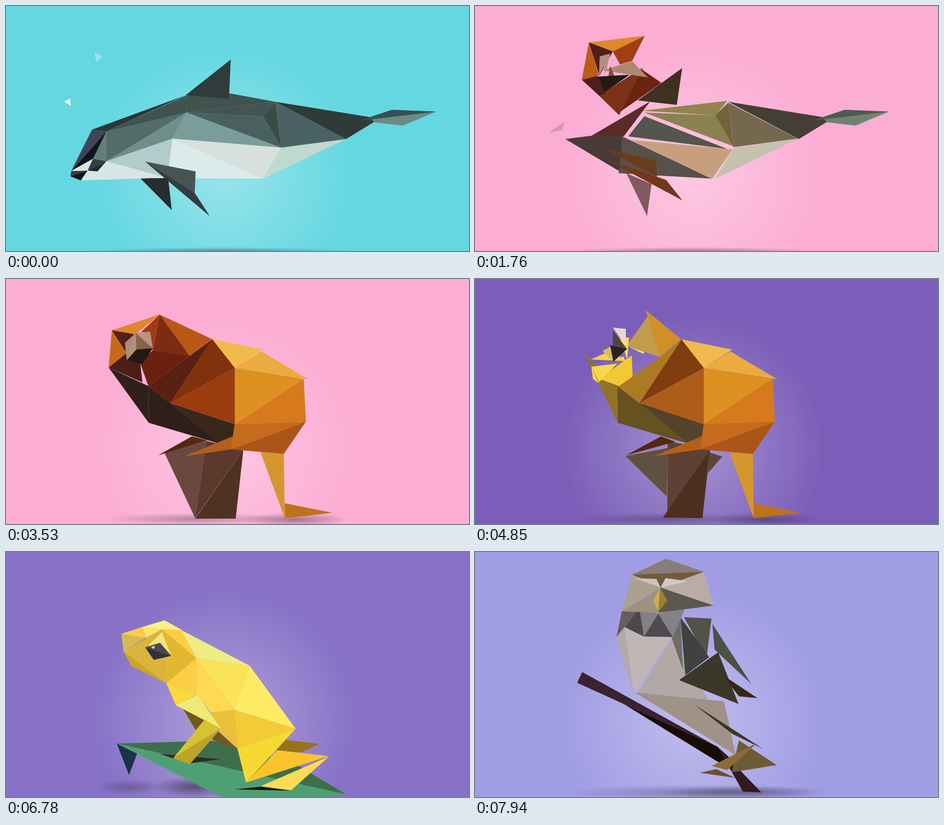
These frames come from a looping animation (1028x545 px, 8 s). An HTML page with a canvas:

```html
<!DOCTYPE html>
<html lang="en">
<head>
<meta charset="utf-8">
<title>Animals in shards</title>
<style>
html, body { margin: 0; width: 100%; height: 100%; overflow: hidden; background: #64d7e1; }
canvas { display: block; width: 1028px; height: 545px; }
</style>
</head>
<body>
<canvas id="stage" width="1028" height="545"></canvas>
<script>
const W = 1028, H = 545, LOOP = 8000;
const ctx = document.getElementById('stage').getContext('2d');

const clamp = v => Math.max(0, Math.min(1, v));
const span = (t, a, b) => clamp((t - a) / (b - a));
const ease = p => 1 - (1 - p ** 1.3) ** 2.5;
const smooth = p => p * p * (3 - 2 * p);
const mix = (a, b, p) => a.map((v, i) => v + (b[i] - v) * p);
const rgb = hex => [0, 2, 4, 6].map(i => i < hex.length ? parseInt(hex.substr(i, 2), 16) / (i > 5 ? 255 : 1) : 1);
const css = c => `rgba(${c[0]},${c[1]},${c[2]},${c[3]})`;

// Pose: "colour x,y x,y x,y"; a lone colour keeps the previous outline.
function pose(text, prev) {
  const [hex, ...pts] = text.split(' ');
  if (!pts.length) return { c: rgb(hex), p: prev.p };
  while (pts.length < 4) pts.push(pts[pts.length - 1]);
  return { c: rgb(hex), p: pts.join(',').split(',').map(Number) };
}

const pieces = [];

// Back to front: porpoise, break-up, raised head, monkey, break-up, frog, owl, first stroke
function piece(whale, burst, raised, monkey, scatter, frog, owl, stroke) {
  const i = pieces.length;
  const lag = i === 4 || i === 33 ? 1 : i > 29 ? 0.6 : 0.92 - i / 33;
  const d = pose(whale), m = pose(burst, d);
  const a = raised && pose(raised, m);
  const k = pose(monkey, m), n = pose(scatter, a || k);
  const f = pose(frog, n), o = pose(owl, f);
  const keys = [];
  if (stroke) keys.push([0, 1000, d]);
  keys.push([1200, 1760, m, 950]);
  if (a) keys.push([1760, 2250, a], [2650, 2850, k], [3910, 4080, a]);
  else keys.push([1760 + (m.p === d.p ? 300 * lag : 0), 2300 + 1230 * lag, k]);
  keys.push([4390, 4850, n], [4850, 5200 + 700 * lag, f], [6800 + 500 * lag, 7500 + 440 * lag, o]);
  pieces.push({ first: stroke ? pose(stroke) : d, keys });
}

// Ground, tail and belly
piece('0d1518 262,383 328,383 372,427', '805a5c 336,372 392,396 382,467', '', '6a4840 352,387 445,360 420,532',
  '60503f 334,394 428,376 426,484', '3d6f4b 246,426 463,420 640,470 755,539', '392231 227,291 238,267 538,433 330,338',
  '262c2f 262,383 324,383 332,454');
piece('d296ad00 170,300 160,320 175,315', 'd296ad 199,257 164,282 193,276', '', '5c382d 445,360 527,380 420,532',
  '5c4134 428,361 523,378 427,535', '4f9f74 246,426 755,539 700,546 480,546', '180d05 330,338 538,433 570,462 546,471');
piece('6b8a84 749,255 919,235 845,266', '708272', '', '4f3221 527,380 510,533 420,533',
  '4c301f 522,380 505,532 417,531', '1c3248 246,426 291,449 273,496', '311a22 538,433 636,535 595,533');
piece('dbebea 333,295 322,383 535,384', '58504a 327,290 319,372 526,384', '', '2f1f19 316,238 317,320 476,367 365,276',
  '665120', '2e2c26 341,449 371,459 408,470 477,461', 'a09289 354,312 553,332 579,452');
piece('355055 749,255 821,231 919,235', '4e5a50', '', 'bf721a 620,532 619,499 724,520',
  'bf721a', '14150f 508,528 567,522 633,531', '68522f 500,491 536,483 576,502');
piece('7a9d9b 333,295 365,237 575,315', '52564e 340,290 376,245 560,318', '', '3a271b 365,276 508,323 504,350 474,366',
  '54432a', '735817 457,417 470,398 514,438', 'b2a8a5 362,312 437,192 518,328');
piece('b2cccb 187,345 333,295 322,383', '4a3a36 201,296 328,280 320,367', '30201b 240,165 316,238 317,320',
  '30201b 228,197 316,238 317,320', '8f7328 242,166 316,238 317,320', '735917 393,349 441,373 421,396', 'b3aaa5 314,190 332,167 352,318');
piece('bfd9d1 535,384 575,315 719,296', 'c4c2ac 533,384 575,316 716,296', '', 'd5962e 619,532 565,385 617,389',
  'd5962e', '997118 600,441 621,418 696,427 655,446', '6d5b33 570,490 586,419 670,474');
piece('2e3b39 562,213 771,247 781,258 719,296', '443f35', '', 'ab5519 499,379 666,317 617,389',
  'ab5519', 'fbc42f 533,513 602,441 717,454', '3c3829 453,285 540,223 585,338');
piece('d8e0dd 333,295 575,315 535,384', 'c6a07e 347,298 572,319 526,385', '', 'c66a1b 508,323 666,317 499,379',
  'c66a1b', 'f7da31 514,438 643,393 533,513', '35281a 549,273 627,325 586,321');

// Flanks and back
piece('3a4c48 562,213 575,315 535,246', '71643b 562,215 575,316 533,243', '', 'd67a1d 661,222 666,317 508,323',
  'd67a1d', 'e9c138 507,351 514,438 470,395 455,357', '4e5044 527,160 613,293 532,217');
piece('4a605f 365,237 535,246 575,315', '8a8151 376,237 534,243 573,312', '', 'dc9120 508,198 661,222 508,323',
  'dc9120', 'f3cb34 507,351 643,393 514,438', '545246 464,145 525,148 514,236');
piece('4b6265 562,213 719,296 575,315', '74694f 562,215 716,295 575,314', '', 'ebab3f 567,161 671,223 508,198',
  'ebab3f', 'ffeb63 541,253 643,393 507,351', '3f4143 456,145 520,234 467,274');
piece('435452 365,237 562,213 535,246', '91844f 370,233 560,211 534,243', '', 'f2ba4c 458,134 571,157 508,198',
  'f2ba4c', 'fae357 422,236 541,253 507,351', '706b66 437,192 456,145 462,263');
piece('41534f 362,200 459,194 562,213 365,237', '5a2b27 388,213 330,290 260,288', '', '81310b 458,134 508,198 365,276',
  '7f3c0d', 'ffd94f 422,236 507,351 455,357 423,316', 'c0b7b5 332,167 375,188 437,190 353,312');
piece('2b3738 155,275 187,279 362,199', '4a3a36 201,296 320,367 328,280', '', '9c3d10 365,276 508,323 508,198',
  'ad5d19', 'fbcf45 356,292 423,317 422,236', '858287 407,137 439,189 467,124');
piece('536c67 187,279 187,345 365,237', '5a2b27 260,288 330,290 388,213', '5a2014 316,238 365,276 458,136 410,175',
  '5a2014 316,238 365,276 458,134 408,171', 'ac7a25', 'fcd93d 356,292 377,341 423,317', '4e4b4e 375,188 439,189 407,137');
piece('2f3c3b 362,199 463,119 459,206', '3e3121 361,210 460,138 448,220', 'b85815 379,69 458,134 410,174',
  'b85815 341,79 458,134 408,171', 'd18f29', 'f0ec84 388,173 541,253 422,236', '838084 365,125 407,137 375,188');

// Head
piece('6f8e8a 187,345 365,237 333,295', '6a2510 369,140 414,171 323,235', '6a2110 337,148 410,174 316,238 290,195',
  '6a2110 326,158 408,171 316,238 298,187', 'f2c934 275,222 348,170 350,217 320,238', 'e2b830 346,172 422,236 356,292', '5c574d 412,79 530,119 407,135');
piece('41534f 187,279 362,200 365,237', '7b3218 373,137 320,243 275,199', '7d2c12 377,66 410,174 337,148',
  '7d2c12 341,79 408,171 326,160', 'c09c4c 384,82 410,174 337,148', 'ffcd45 346,172 388,173 422,236', 'baaca4 508,44 530,119 412,79');
piece('627f7c 187,279 187,345 157,340', 'a03f15 377,66 349,122 322,130 306,101', 'a03c15',
  'a03c15 341,79 326,160 315,118 300,118', 'fdd94e 342,130 338,180 322,131', 'ffe569 346,172 312,191 302,167', '4d494b 365,125 375,188 332,167');
piece('d6e6e3 145,366 187,345 320,382 130,388', '4d1f1a 237,164 272,155 290,195 275,199', '4d1d19 237,164 272,150 290,195 320,243',
  '4d1d19 228,197 270,160 298,187 303,230', 'fcd748 259,195 316,188 275,230', 'cba528 261,222 356,292 279,254', '695c5d 326,132 365,125 314,189');
piece('3f4653 109,367 155,275 187,279', 'e0882c 253,81 377,66 306,101', 'e0862c',
  'e0862c 235,114 341,79 287,123', 'f5e38a 339,150 375,162 375,167', 'fdf07f 302,167 352,152 392,174 345,172', '897d7a 349,50 424,15 508,44');
piece('101420 187,279 157,340 109,367', 'bc5c17 253,81 275,155 237,164', 'c56a1b',
  'c56a1b 235,114 268,165 228,197', 'fcdc48 258,193 274,232 262,222', 'd3ba54 256,182 312,190 261,222', 'aba190 349,50 412,79 326,132');
piece('333d3d 109,367 145,366 107,379', '4f1f18 253,81 306,101 276,155', '55201a',
  '55201a 235,114 287,123 268,165', 'f8d044 257,179 300,160 340,183', 'fdcb47 256,182 302,167 312,191', '715a3f 349,50 508,44 412,79');

// Muzzle, eye and beak
piece('0f1420 107,379 145,366 130,388', 'b48f80 278,113 300,106 290,150', 'ad8b79 282,133 306,108 285,172',
  'ad8b79 264,142 288,120 268,181', 'd9bd5d 283,160 305,148 303,180', 'dcb43c 261,222 346,172 356,292', 'a0907f 326,132 412,80 407,135');
piece('dbe5dc 109,367 157,340 145,366', 'ad8870 283,143 349,123 384,159', 'b8937d 306,108 335,111 338,154',
  'b8937d 288,120 320,117 326,154', 'e7dad0 306,108 335,111 335,149', 'f3e383 315,209 346,178 367,231', 'd1c7c3 412,79 423,58 473,65');
piece('353f42 157,340 187,345 145,366', '7a4f30 300,133 310,157 296,158', '876344 306,110 338,154 305,150',
  '876344 288,120 326,154 289,158', '4f453b 306,115 337,155 306,147', '4a4a4c 342,202 367,231 309,212', 'cfc3c0 354,58 403,60 412,79');
piece('202a30 145,366 187,345 167,368', '241b14 273,157 343,153 288,192', '221a14 302,149 338,154 312,184 284,174',
  '221a14 289,157 326,154 303,189 268,181', '2b2226 300,147 338,155 307,184', '35303a 309,212 367,231 328,240', 'cfae4a 396,108 411,80 407,133');
piece('dbe5dc 109,367 157,340 145,366', 'b48f80 277,112 300,106 275,155', 'b3917f 306,108 305,150 285,172',
  'b3917f 288,120 289,157 268,181', 'fdd94e 322,175 332,172 330,180', 'f5e98e 322,211 331,209 328,216', '99802f 411,80 427,108 407,133');

// Flippers, arms and feet
piece('465553 273,346 387,368 413,410', '6b3c1c 288,317 402,344 404,381', '', '52290e 338,392 413,350 447,359',
  '52290e 336,392 413,350 445,362', 'efe978 377,341 425,317 477,393', '3b3820 488,340 640,438 572,405',
  '465553 273,346 385,368 383,416');
for (const [frog, owl] of [['d8c232 371,459 441,373 476,393', '8c6a38 526,476 626,425 560,485'],
                           ['bba428 371,459 477,393 408,472', '8c6a38 526,476 626,425 560,485']])
  piece('343c42 273,346 413,410 456,446', '73371a 290,341 424,387 460,432', '', 'b45f19 397,394 504,350 499,379',
    'b45f19', frog, owl, '343c42 273,346 383,416 416,467');
piece('355055 749,255 821,231 919,235', '4e5a50', '', 'bf721a 620,532 619,499 724,520',
  '5d4437 521,386 549,395 517,432', 'ffda54 565,521 717,455 633,530', '68522f 500,491 536,483 576,502');

// Backdrop colours: start, end, colour
const skies = [[900, 1700, 'fcadd4'], [4390, 4900, '7a5eb9'], [6600, 7400, 'a19de4']];

// Two ground shadows: x, y, rx, ry, alpha
const shadows = [
  [0, 0, [480, 547, 300, 11, .4], [480, 547, 200, 8, .1]],
  [1800, 3400, [420, 534, 200, 14, .3], [640, 535, 120, 15, .4]],
  [5000, 5900, [275, 523, 75, 18, .28], [415, 523, 90, 23, .5]],
  [6900, 7900, [500, 535, 300, 18, .3], [590, 534, 180, 14, .35]]
];

const bubbles = [
  [129, 213, 142, 206, 144, 222, .9],
  [196, 102, 214, 112, 201, 125, .35],
  [165, 41, 173, 38, 172, 45, .1],
  [165, 41, 173, 38, 172, 45, 0]
];

function poly(p, fill) {
  ctx.fillStyle = fill;
  ctx.beginPath();
  for (let i = 0; i < p.length; i += 2) ctx.lineTo(p[i], p[i + 1]);
  ctx.fill();
}

function blob(x, y, rx, ry, tint, alpha) {
  const g = ctx.createRadialGradient(0, 0, 0, 0, 0, 1);
  g.addColorStop(0, `rgba(${tint},${alpha})`);
  g.addColorStop(1, `rgba(${tint},0)`);
  ctx.save();
  ctx.translate(x, y);
  ctx.scale(rx, ry);
  ctx.fillStyle = g;
  ctx.beginPath();
  ctx.arc(0, 0, 1, 0, 7);
  ctx.fill();
  ctx.restore();
}

function backdrop(t) {
  let sky = rgb('64d7e1');
  for (const [a, b, hex] of skies) sky = mix(sky, rgb(hex), ease(span(t, a, b)));
  ctx.fillStyle = css(sky);
  ctx.fillRect(0, 0, W, H);
  blob(485, 375, 292, 292, '255,255,255', .33);
  for (const n of [2, 3]) {
    let s = shadows[0][n];
    for (const key of shadows.slice(1)) s = mix(s, key[n], smooth(span(t, key[0], key[1])));
    blob(s[0], s[1], s[2], s[3], '30,20,40', s[4]);
  }
}

function drawBubbles(t) {
  const fade = 1 - span(t, 0, 1000);
  if (!fade) return;
  for (let k = 0; k < 3; k++) {
    const s = Math.min(2.999, k + t / 850), n = Math.floor(s);
    const b = mix(bubbles[n], bubbles[n + 1], s - n);
    poly(b.slice(0, 6), `rgba(255,255,255,${b[6] * fade})`);
  }
}

function drawPiece({ first, keys }, t) {
  let { p, c } = first;
  for (const [a, b, next, tint = a] of keys) {
    if (t < tint) break;
    p = mix(p, next.p, ease(span(t, a, b)));
    c = mix(c, next.c, span(t, tint, b));
  }
  poly(p, css(c));
}

function frame(now) {
  const t = now % LOOP;
  const swim = 1 - smooth(span(t, 0, 900));
  backdrop(t);
  ctx.save();
  ctx.translate(36 * (swim - 1), 0);
  drawBubbles(t);
  ctx.restore();
  ctx.save();
  ctx.translate(36 * swim, 0);
  for (const item of pieces) drawPiece(item, t);
  ctx.restore();
  requestAnimationFrame(frame);
}
requestAnimationFrame(frame);
</script>
</body>
</html>
```
